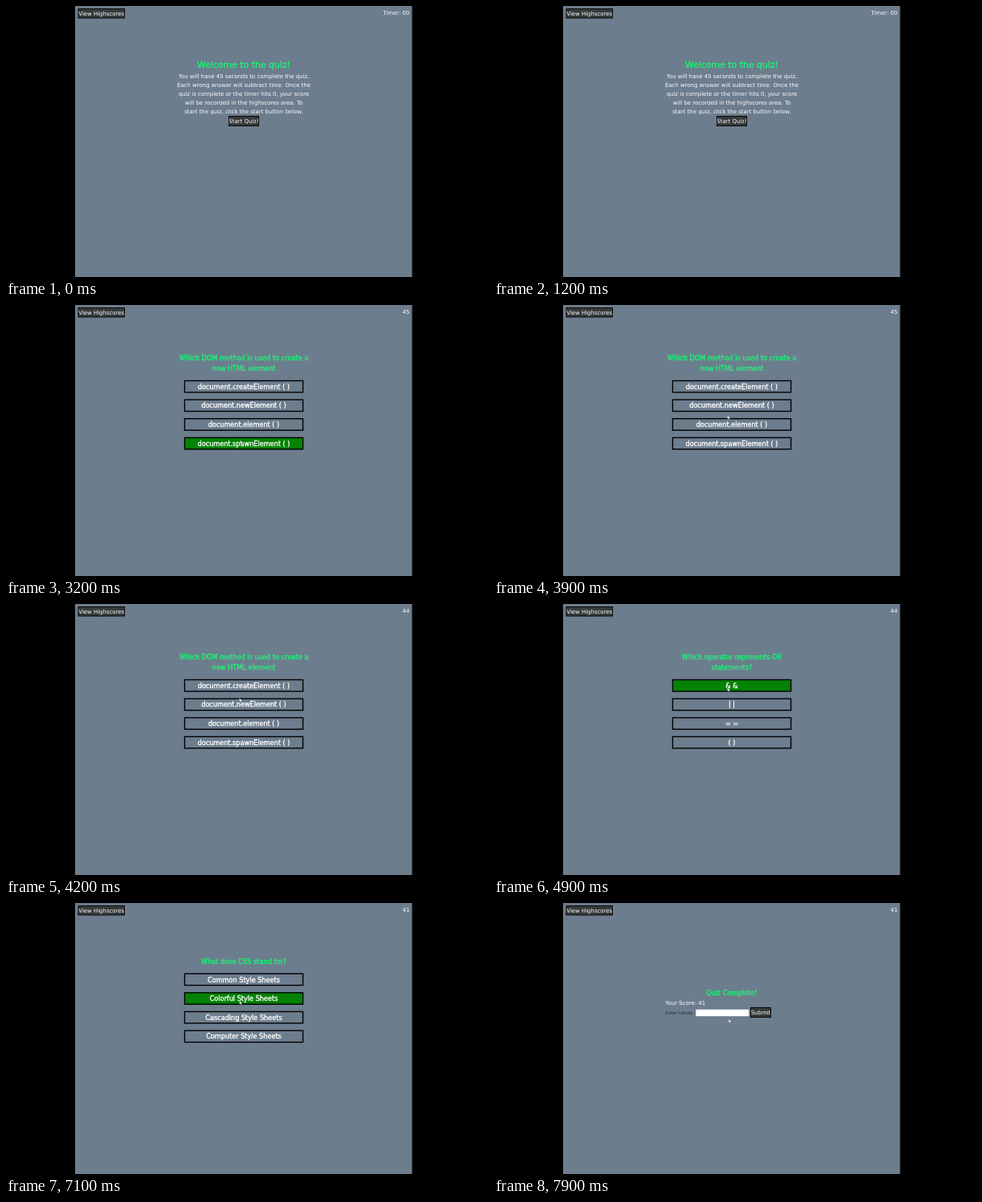
Recreate the animation shown at these times as an HTML page. Size 600 by 338 pixels, loop 8000 ms.

```html
<!DOCTYPE html>
<html lang="en">
<head>
<meta charset="utf-8">
<title>Quiz</title>
<style>
  html, body { margin: 0; width: 100%; height: 100%; overflow: hidden; background: #000; }
  svg { display: block; width: 600px; height: 338px; }
  text { font: 6.95px "DejaVu Sans", sans-serif; fill: #fff; white-space: pre; }
  .mid { text-anchor: middle; }
  .end { text-anchor: end; }
  .bold { font-size: 8.15px; stroke: #fff; stroke-width: .35px; }
  .title { font-size: 8.22px; fill: #18f676; stroke: #18f676; stroke-width: .35px; }
  .big { font-size: 10.9px; }
  .label { font-size: 5.45px; fill: #26303a; }
  .btn { fill: #363a3b; stroke: #080808; stroke-width: 1; }
  .answer { fill: none; stroke: #000; stroke-width: 1.4; }
  .answer.hover { fill: #048204; }
</style>
</head>
<body>
<svg id="stage" viewBox="0 0 600 338" xmlns="http://www.w3.org/2000/svg"></svg>
<script>
const LOOP = 8000, MID = 296, PITCH = 23.65, BOX_H = 15;
const stage = document.getElementById('stage');

function add(parent, tag, attrs, text) {
  const el = document.createElementNS('http://www.w3.org/2000/svg', tag);
  for (const k in attrs) el.setAttribute(k, attrs[k]);
  if (text) el.textContent = text;
  return parent.appendChild(el);
}
const rect = (p, x, y, width, height, attrs) => add(p, 'rect', { x, y, width, height, ...attrs });
const label = (p, x, y, cls, text) => add(p, 'text', { x, y, class: cls }, text);

function button(p, x, y, w, h, text) {
  rect(p, x + .5, y + .5, w - 1, h - 1, { class: 'btn' });
  label(p, x + w / 2, y + h / 2 + 2.4, 'mid', text);
}

rect(stage, 86, 0, 419.5, 338, { fill: '#6c7d8d' });
button(stage, 89.5, 3, 58.5, 12.5, 'View Highscores');
const timer = label(stage, 502.4, 10.9, 'end', '');

const screens = [];
function screen(start) {
  const s = { start, group: add(stage, 'g', {}), boxes: [], top: 0 };
  screens.push(s);
  return s;
}

function question(start, lines, answers) {
  const s = screen(start), g = s.group;
  s.top = lines.length > 1 ? 94.5 : 88.2;
  lines.forEach((l, i) => label(g, MID, (lines.length > 1 ? 69 : 75.5) + 13 * i, 'mid title', l));
  answers.forEach((a, i) => {
    const y = s.top + PITCH * i;
    s.boxes.push(rect(g, 222.4, y, 147.2, BOX_H - .6, { class: 'answer' }));
    label(g, MID, y + 10.3, 'mid bold', a);
  });
}

const intro = screen(0).group;
label(intro, MID, 77, 'mid title big', 'Welcome to the quiz!');
[
  'You will have 45 seconds to complete the quiz.',
  'Each wrong answer will subtract time. Once the',
  'quiz is complete or the timer hits 0, your score',
  'will be recorded in the highscores area. To',
  'start the quiz, click the start button below.'
].forEach((l, i) => label(intro, MID, 90 + 11 * i, 'mid', l));
button(intro, 277, 137, 38, 13, 'Start Quiz!');

question(2000, ['Which of the following is an example of', 'an array?'],
  ['{ }', '( )', '< >', '[ ]'].map(v => 'var array = ' + v));
question(2700, ['Which DOM method is used to create a', 'new HTML element'],
  ['createElement', 'newElement', 'element', 'spawnElement'].map(v => `document.${v} ( )`));
question(4800, ['Which operator represents OR', 'statements?'], ['& &', '| |', '= =', '( )']);
question(6300, ['What does CSS stand for?'],
  ['Common', 'Colorful', 'Cascading', 'Computer'].map(v => v + ' Style Sheets'));

const done = screen(7600).group;
label(done, MID, 115.4, 'mid title', 'Quiz Complete!');
label(done, 213.3, 127, '', 'Your Score: 41');
label(done, 213.3, 138.5, 'label', 'Enter initials:');
rect(done, 251.3, 132.8, 66, 8.4, { fill: '#fff' });
button(done, 319, 130, 26, 13, 'Submit');

const cursor = add(stage, 'path', {
  d: 'M0 0V5L1.2 4L2 5.6L2.9 5.2L2.2 3.7H3.7Z',
  fill: '#fff', stroke: '#222', 'stroke-width': .3
});

// time, x, y of the pointer tip
const path = [
  [0, 291.5, 145], [2100, 291.5, 145], [2500, 291.5, 168.5], [3550, 291.5, 168.5],
  [3900, 290.5, 137.5], [4400, 290.5, 104], [5500, 290.5, 104], [5850, 290.5, 121.5],
  [7100, 290.5, 121.5], [7450, 292, 144.5], [LOOP, 292, 144.5]
];

function pointer(t) {
  const i = path.findIndex(p => p[0] > t);
  const [t0, x0, y0] = path[i - 1], [t1, x1, y1] = path[i];
  const k = (t - t0) / (t1 - t0);
  return [x0 + (x1 - x0) * k, y0 + (y1 - y0) * k];
}

function draw(t) {
  const [x, y] = pointer(t);
  const now = screens.filter(s => s.start <= t).pop();
  for (const s of screens) s.group.style.display = s === now ? '' : 'none';
  now.boxes.forEach((b, i) => {
    const top = now.top + PITCH * i;
    b.classList.toggle('hover', y >= top && y <= top + BOX_H);
  });
  timer.textContent = t < 3000 ? 'Timer: 00' : 48 - Math.min(7, Math.floor(t / 1000));
  cursor.setAttribute('transform', `translate(${x} ${y})`);
  cursor.style.display = t < 2100 ? 'none' : '';
}

const begin = performance.now();
function tick() {
  draw((performance.now() - begin) % LOOP);
  requestAnimationFrame(tick);
}
tick();
</script>
</body>
</html>
```
